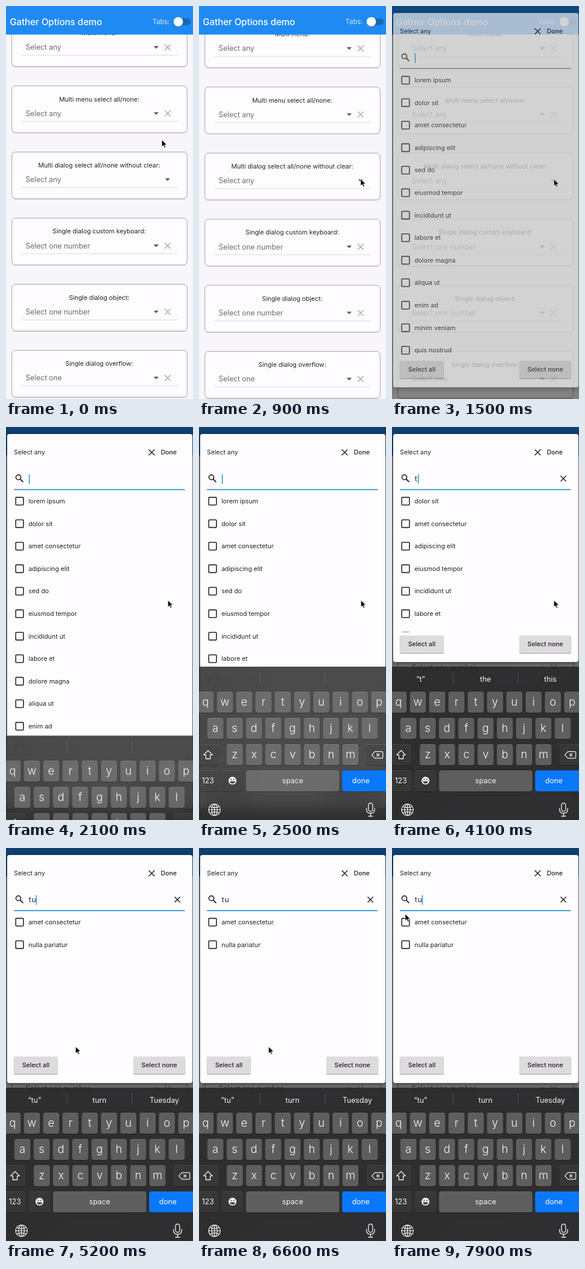
Animation of 320 by 674 pixels, one loop 8 s. Source, as an HTML page:

```html
<!DOCTYPE html>
<html lang="en">
<head>
<meta charset="utf-8">
<title>Gather Options demo</title>
<style>
  html, body { margin: 0; width: 100%; height: 100%; overflow: hidden; }
  #stage { position: relative; width: 320px; height: 674px; overflow: hidden; background: #f8f6fa; }
  #stage div, svg { position: absolute; left: 0; }
  svg { display: block; top: 0; overflow: hidden; font-family: Inter, "Open Sans", sans-serif; }
  .m { text-anchor: middle; }
  .b { font-weight: 500; }

  .cards, .scrim, .dialog, .list, .foot, .line, .caret, .keys, .mouse,
  .s0, .s1, .s2, .on1, .on2 { animation: 8s linear infinite; }
  .s0, .s1, .s2, .on1, .on2 { animation-timing-function: step-end; }

  .cards { animation-name: scroll; }
  @keyframes scroll { 0%, 1.25% { transform: none; } 10%, 100% { transform: translateY(1.8px); } }

  .scrim { top: 0; width: 320px; height: 674px; background: #000; animation-name: dim; }
  @keyframes dim { 0%, 17.5% { opacity: 0; } 18.75% { opacity: .48; } 20%, 100% { opacity: .54; } }

  #stage .dialog { left: 1.5px; top: 12px; width: 317px; height: 642px; overflow: hidden; border-radius: 4px;
    background: #fffdff; animation-name: fade, shrink; box-shadow: 0 3px 8px #0006; }
  .dialog > svg { left: -1.5px; }
  @keyframes fade { 0%, 17.5% { opacity: 0; } 18.75% { opacity: .64; } 20%, 100% { opacity: 1; } }
  @keyframes shrink { 0%, 31.25% { height: 642px; } 33.75%, 100% { height: 391px; } }
  .list { top: 97px; bottom: 51px; width: 317px; overflow: hidden; }
  .list svg { left: -1.5px; }
  .dialog > .foot { top: auto; bottom: 0; animation: none; }

  .line { animation-name: focus; }
  @keyframes focus { 0%, 19% { stroke: #777; stroke-width: 1.2px; } 21.25%, 100% { stroke: #2593d1; stroke-width: 1.8px; } }

  .caret { animation-name: blink, step; animation-timing-function: linear, step-end; }
  @keyframes blink {
    0%, 31.25%, 40%, 43.75%, 46.25%, 52.5%, 58.75%, 65%, 73.75%, 77.5%, 86.25%, 90%, 98.75%, 100% { opacity: 1; }
    33.75%, 37.5%, 46.24%, 55%, 58.74%, 67.5%, 71.25%, 80%, 83.75%, 92.5%, 96.25% { opacity: 0; }
  }
  @keyframes step { 0% { transform: none; } 46.25% { transform: translateX(5.2px); } 58.75%, 100% { transform: translateX(12.2px); } }

  .s0 { animation-name: s0; }
  .s1 { animation-name: s1; }
  .s2, .on2 { animation-name: on2; }
  .on1 { animation-name: on1; }
  @keyframes s0 { 0% { visibility: visible; } 46.25%, 100% { visibility: hidden; } }
  @keyframes s1 { 0% { visibility: hidden; } 46.25% { visibility: visible; } 58.75%, 100% { visibility: hidden; } }
  @keyframes on1 { 0% { visibility: hidden; } 46.25%, 100% { visibility: visible; } }
  @keyframes on2 { 0% { visibility: hidden; } 58.75%, 100% { visibility: visible; } }

  .keys { top: 411px; width: 320px; height: 263px; background: #1e1e20cc; backdrop-filter: blur(14px); animation-name: rise; }
  @keyframes rise {
    0%, 25% { transform: translateY(263px); }
    26.25% { transform: translateY(119px); }
    27.5% { transform: translateY(50px); }
    28.75% { transform: translateY(15px); }
    30%, 100% { transform: none; }
  }

  .mouse { animation-name: point; }
  @keyframes point {
    0%, 1.25% { transform: translate(266px, 229px); animation-timing-function: ease-in-out; }
    11.25%, 12.5% { transform: translate(276px, 296px); }
    13.75%, 53.75% { transform: translate(276.5px, 296.5px); animation-timing-function: ease-in-out; }
    63.75%, 86.25% { transform: translate(118.5px, 340px); animation-timing-function: ease-in-out; }
    92.5% { transform: translate(11px, 138px); animation-timing-function: ease-in-out; }
    97.5%, 100% { transform: translate(22px, 112.5px); }
  }
</style>
</head>
<body>
<div id="stage"></div>
<script>
const svg = (y, h, body, cls = '') =>
  `<svg class="${cls}" width="320" height="${h}" viewBox="0 ${y} 320 ${h}">${body}</svg>`;
// y is the middle of the capital letters
const text = (x, y, s, size, fill = '#222', cls = '') =>
  `<text x="${x}" y="${y + size * .36}" font-size="${size}" fill="${fill}" class="${cls}">${s}</text>`;
const rect = (x, y, w, h, r, fill, more = '') =>
  `<rect x="${x}" y="${y}" width="${w}" height="${h}" rx="${r}" fill="${fill}" ${more}/>`;
const path = (d, stroke, w = 1.5, more = '') =>
  `<path d="${d}" fill="none" stroke="${stroke}" stroke-width="${w}" ${more}/>`;
const cross = (x, y, r, color, w) =>
  path(`M${x - r} ${y - r}l${2 * r} ${2 * r}m0 ${-2 * r}l${-2 * r} ${2 * r}`, color, w);

function card(title, hint, i) {
  const y = 23.6 + i * 113.4, clear = i !== 2, ax = clear ? 257 : 276.5;
  return rect(10, y + 1, 300, 80.3, 6, '#0002') +
    rect(10, y, 300, 80.3, 6, '#fefcfe', 'stroke="#a3a1a5"') +
    text(159.5, y + 22.8, title, 10.8, '#222', 'm') +
    text(33.5, y + 47.3, hint, 12.4, '#6c6b6e') +
    path(`M26 ${y + 61}H294`, '#d6d4d8', .8) +
    `<path d="M${ax - 4.4} ${y + 45.2}h8.8l-4.4 4.4z" fill="#5a595c"/>` +
    (clear ? cross(276.5, y + 47.3, 5, '#b0aeb2', 1.5) : '');
}

const cards = [
  ['Multi menu:', 'Select any'],
  ['Multi menu select all/none:', 'Select any'],
  ['Multi dialog select all/none without clear:', 'Select any'],
  ['Single dialog custom keyboard:', 'Select one number'],
  ['Single dialog object:', 'Select one number'],
  ['Single dialog overflow:', 'Select one'],
].map(([title, hint], i) => card(title, hint, i)).join('');

const page = svg(0, 674, `<g class="cards">${cards}</g>` +
  rect(0, 0, 320, 49, 0, '#1f8af2') +
  text(6.5, 27, 'Gather Options demo', 15.5, '#fff', 'b') +
  text(250.5, 27, 'Tabs:', 11.6, '#d5e9fc') +
  rect(290, 21.3, 26, 11.4, 5.7, '#1a68b4') +
  '<circle cx="294.8" cy="27.6" r="8.2" fill="#0003"/><circle cx="294.8" cy="27" r="8" fill="#fff"/>');

const items = ['lorem ipsum', 'dolor sit', 'amet consectetur', 'adipiscing elit', 'sed do',
  'eiusmod tempor', 'incididunt ut', 'labore et', 'dolore magna', 'aliqua ut', 'enim ad',
  'minim veniam', 'quis nostrud', 'nulla pariatur'];
const rows = query => items.filter(s => s.includes(query)).map((s, i) => {
  const y = 127.2 + i * 38.6;
  return rect(16.6, y - 6.6, 13.2, 13.2, 1.2, 'none', 'stroke="#222" stroke-width="1.6"') +
    text(38.5, y, s, 10.8);
}).join('');
const list = ['', 't', 'tu'].map((q, i) => `<g class="s${i}">${rows(q)}</g>`).join('');

const head = text(13.5, 43.5, 'Select any', 10.8) +
  cross(249.3, 43.5, 5, '#222', 1.5) + text(265, 43.5, 'Done', 10.8, '#222', 'b') +
  '<circle cx="21.2" cy="86.3" r="4.2" fill="none" stroke="#222" stroke-width="1.6"/>' +
  path('M24.3 89.4l5 5', '#222', 2) +
  text(39, 89, 't', 12.4, '#222', 'on1') + text(43.9, 89, 'u', 12.4, '#222', 'on2') +
  rect(39, 81, 1.5, 16.5, 0, '#2593d1', 'class="caret"') +
  `<g class="on1">${cross(293.3, 88.5, 4.7, '#222', 1.5)}</g>` +
  path('M13.5 107.3H306', '#777', 1.2, 'class="line"');

const button = (x, w, label) =>
  rect(x, 8.5, w, 29.5, 2, '#0003') + rect(x - .3, 7.3, w + .6, 30.4, 2, '#0002') +
  rect(x, 6.5, w, 30, 1.5, '#dddbde') + text(x + w / 2, 21, label, 10.8, '#222', 'm b');
const foot = svg(0, 52, button(13.5, 75, 'Select all') + button(218, 88.5, 'Select none'), 'foot');

const dialog = `<div class="dialog">${svg(12, 642, head)}
  <div class="list">${svg(109, 545, list)}</div>${foot}</div>`;

const white = '#f4f4f5';
const key = (x, y, w, fill = '#ffffff48') =>
  rect(x, y + 1, w, 36, 4, '#0005') + rect(x, y, w, 36, 4, fill);
const letters = [['qwertyuiop', 11.3], ['asdfghjkl', 28], ['zxcvbnm', 61.2]].map(([row, x0], r) =>
  [...row].map((c, i) => {
    const x = x0 + i * 33, y = 454 + r * 45;
    return key(x - 13.7, y, 27.4) +
      `<text x="${x}" y="${y + 23.6}" font-size="19" font-weight="300" fill="${white}" class="m">${c}</text>`;
  }).join('')).join('');
const hints = (cls, words) =>
  `<g class="${cls}">${words.map((w, i) => text(49 + i * 111, 432, w, 12.6, white, 'm')).join('')}</g>`;
const dark = '#ffffff1c';

const keys = svg(411, 263,
  path('M104.5 421v19M215.5 421v19', '#ffffff24', 1) +
  hints('s1', ['“t”', 'the', 'this']) + hints('s2', ['“tu”', 'turn', 'Tuesday']) + letters +
  key(-6, 544, 39, dark) + key(287, 544, 39, dark) +
  path('M15.5 554.8l7.6 7.6h-3.8v6.6h-7.6v-6.6H7.900z', white, 1.3, 'stroke-linejoin="round"') +
  path('M301 556.600h11.500q2 0 2 2v7.500q0 2-2 2H301l-5.200-5.700z', white, 1.2, 'stroke-linejoin="round"') +
  cross(306.2, 562.4, 2.4, white, 1.2) +
  key(-6, 589, 39.5, dark) + text(15.3, 606.5, '123', 12.6, white, 'm') +
  key(39, 589, 36.7, dark) +
  `<circle cx="57.300" cy="606.500" r="6.800" fill="${white}"/>` +
  '<path d="M52.800 607.500h9q-.600 4-4.500 4t-4.500-4z" fill="#444"/>' +
  '<circle cx="55" cy="604.300" r="1.100" fill="#444"/><circle cx="59.600" cy="604.300" r="1.100" fill="#444"/>' +
  key(80.5, 589, 159.5) + text(160.3, 606.5, 'space', 12.6, white, 'm') +
  key(245, 589, 81, '#0a78fb') + text(277, 606.5, 'done', 12.6, '#fff', 'm') +
  '<g transform="translate(26.500 656.500)">' +
  path('M-10 0a10 10 0 1 0 20 0a10 10 0 1 0-20 0zH10M0-10V10M-8-5.800Q0-1.600 8-5.800M-8 5.800Q0 1.600 8 5.800', white, 1.2) +
  `<ellipse rx="4.800" ry="10" fill="none" stroke="${white}" stroke-width="1.200"/></g>` +
  rect(290, 645, 7.2, 14, 3.6, 'none', `stroke="${white}" stroke-width="1.300"`) +
  path('M286.600 653.500v2q0 7 7 7t7-7v-2M293.600 662.500v5M289.600 667.500h8', white, 1.3));

const mouse = svg(0, 674, '<path class="mouse" d="M.500.500v12l2.800-2.600 1.900 4.300 2-.900-1.900-4.200h3.900z"' +
  ' fill="#000" stroke="#fff" stroke-width=".800"/>');

document.getElementById('stage').innerHTML =
  page + '<div class="scrim"></div>' + dialog + `<div class="keys">${keys}</div>` + mouse;
</script>
</body>
</html>
```
